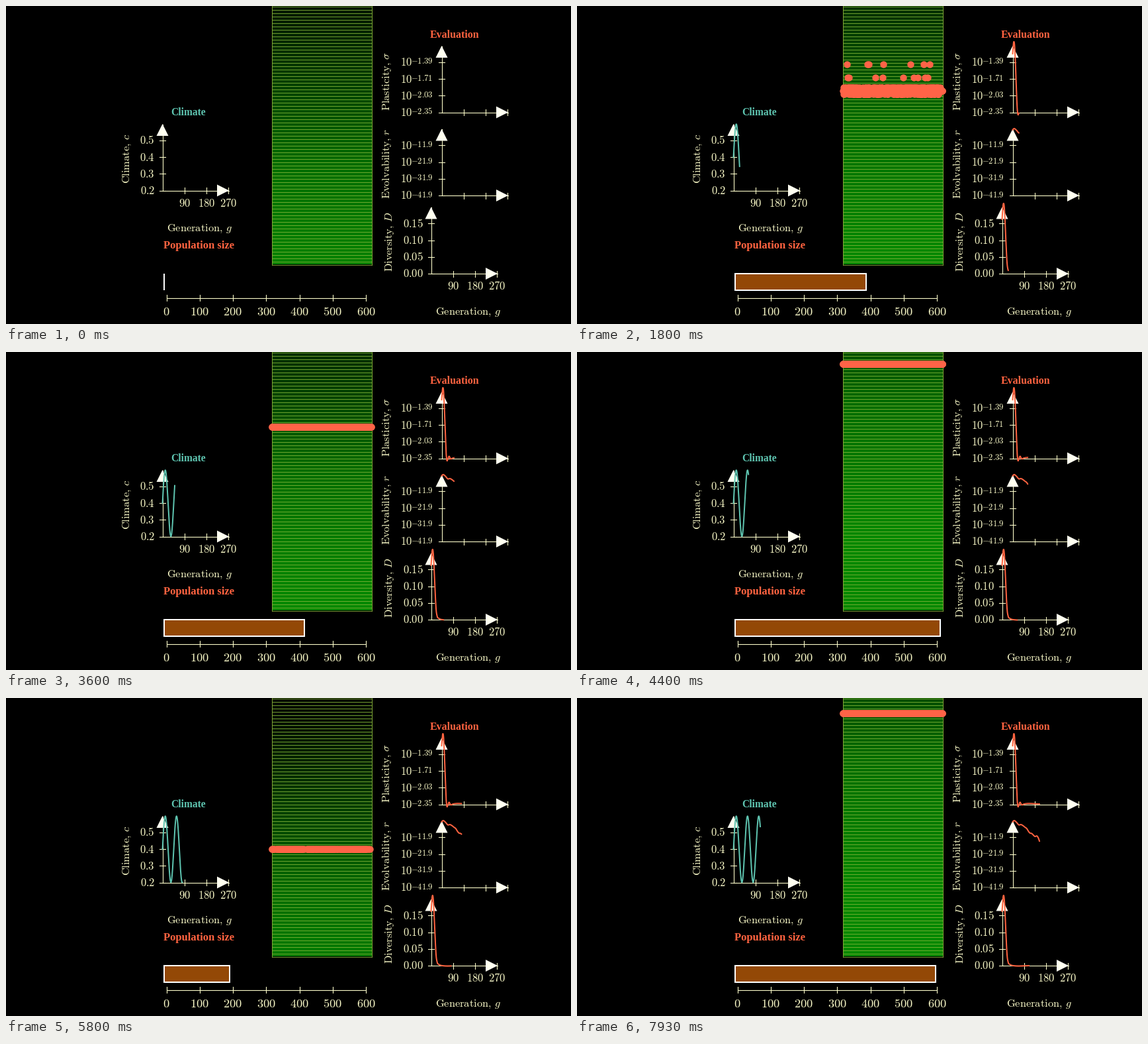
Animation of 854 by 480 pixels, one loop 8 s. Source, as a matplotlib script:

```python
import numpy as np
import matplotlib.pyplot as plt
from matplotlib.animation import FuncAnimation
from matplotlib.patches import Polygon, Rectangle

W, H, DPI = 854, 480, 64
FRAMES, LOOP = 120, 8000
PX = 72 / DPI                      # points per pixel

INK, TIP = "#fafac8", "#fffff0"
TOMATO, TEAL, BROWN = "#ff6340", "#5ec4b0", "#934806"
CYCLE = 0.02017                    # climate cycles per frame
STEP = 17 * CYCLE                  # curve pixels per frame

plt.rcParams["mathtext.fontset"] = "cm"
fig = plt.figure(figsize=(W / DPI, H / DPI), dpi=DPI, facecolor="black")
ax = fig.add_axes([0, 0, 1, 1])
ax.set_axis_off()


def line(xs, ys, color=INK, width=1.1, z=2):
    return ax.plot(xs, ys, color=color, lw=width * PX, zorder=z)[0]


def tex(x, y, s, size=16.5, ha="center", rot=0):
    ax.text(x, y, f"${s}$", color=INK, fontsize=size * PX, ha=ha, va="baseline",
            rotation=rot, rotation_mode="anchor", zorder=3)


def digits(x, y, s, size=16.7, ha="center"):
    tex(x, y + 0.325 * size, s, size, ha)


def name(x, y, word, var, rot=0):
    tex(x, y, rf"\mathrm{{{word},}}\,{var}", 16.4, rot=rot)


def title(x, y, s, color, size):
    ax.text(x, y, s, color=color, fontsize=size * PX, family="Liberation Serif",
            weight="bold", ha="left", va="baseline", zorder=3)


def axes(x, y, y_labels, powers=False, x_labels=True):
    line([x, x + 100], [y, y])
    line([x, x], [y, y - 100])
    for tip in ([(x + 100.5, y), (x + 82.5, y - 9), (x + 82.5, y + 9)],
                [(x, y - 100.5), (x - 9, y - 82.5), (x + 9, y - 82.5)]):
        ax.add_patch(Polygon(tip, color=TIP, lw=0, zorder=3))
    for i, s in enumerate(y_labels):
        ty = y - 25.2 * i
        line([x - 4.5, x + 4.5], [ty, ty])
        if powers:
            digits(x - 62.5, ty, "10", ha="left")
            digits(x - 46, ty - 1.5, "-" + s, 12.6, ha="left")
        else:
            digits(x - 11.5, ty, s, ha="right")
    for i in (1, 2, 3):
        tx = x + 33.2 * i
        line([tx, tx], [y - 4.5, y + 4.5])
        if x_labels:
            digits(tx, y + 18.7, str(90 * i))


def smooth(keys, n):
    """Cubic Hermite curve through (frame, value) points."""
    kx, ky = np.array(keys, float).T
    m = np.gradient(ky, kx)
    i = np.clip(np.searchsorted(kx, n, side="right") - 1, 0, len(kx) - 2)
    h = kx[i + 1] - kx[i]
    t = (n - kx[i]) / h
    return ((1 + 2 * t) * (1 - t) ** 2 * ky[i] + t * (1 - t) ** 2 * h * m[i]
            + t * t * (3 - 2 * t) * ky[i + 1] + t * t * (t - 1) * h * m[i + 1])


def snap(y):
    return 3 + 5 * np.round((np.asarray(y) - 3) / 5)


# Static parts
axes(236.5, 278.5, ["0.2", "0.3", "0.4", "0.5"])
axes(658.5, 160.5, ["2.35", "2.03", "1.71", "1.39"], powers=True, x_labels=False)
axes(658.5, 286, ["41.9", "31.9", "21.9", "11.9"], powers=True, x_labels=False)
axes(642.5, 404, ["0.00", "0.05", "0.10", "0.15"])

name(187, 230.5, "Climate", "c", 90)
name(580, 113, "Plasticity", r"\sigma", 90)
name(580, 238.5, "Evolvability", "r", 90)
name(584, 356, "Diversity", "D", 90)
name(292, 339.5, "Generation", "g")
name(698, 465.5, "Generation", "g")

title(249.5, 165, "Climate", TEAL, 15.5)
title(238, 366, "Population size", TOMATO, 16.6)
title(640.5, 47.5, "Evaluation", TOMATO, 15.9)

line([242.5, 544], [440.5, 440.5])
for i in range(7):
    tx = 242.5 + 50.25 * i
    line([tx, tx], [436, 445])
    digits(tx, 460.5, str(100 * i), 18.5)

# Niche band
EDGES = 0.5 + 5 * np.arange(79)
ROWS = EDGES - 2.5
band = ax.imshow(np.zeros((79, 1, 3)), extent=(401.5, 552.5, 390.5, -4.5),
                 interpolation="nearest", aspect="auto", zorder=1)
ax.hlines(EDGES, 401.5, 552.5, color="#8cb43c", lw=0.8 * PX, zorder=2)
for ex in (401.5, 552.5):
    line([ex, ex], [0, 390.5], "#8cb43c", 0.9)

# Moving parts
dots = ax.scatter([], [], s=(10.4 * PX) ** 2, color="#ff6347", lw=0, zorder=4)
bar = ax.add_patch(Rectangle((238.5, 403.5), 0, 25, fc=BROWN, ec="white",
                             lw=2 * PX, joinstyle="miter", zorder=3))

SIGMA = [(0, 72), (5, 54), (8, 58), (12, 85), (17, 130), (20, 154), (23, 163.5),
         (27, 162), (32, 157.5), (39, 161), (50, 160), (119, 160)]
EVOLV = [(0, 187), (6, 185), (12, 186), (18, 188), (27, 191.5), (36, 191),
         (45, 192.5), (54, 195), (62, 197), (70, 201.5), (77, 204), (84, 204.5),
         (90, 206.5), (98, 209), (108, 208.5), (114, 212), (119, 217)]
DIVERS = [(0, 322), (4, 302), (7, 298), (10, 305), (12, 317), (17, 355),
          (22, 388), (27, 399), (34, 402), (42, 403.5), (50, 404), (119, 404)]

T = np.linspace(0, FRAMES - 1, (FRAMES - 1) * 4 + 1)
CURVES = [(line([], [], color, 2, 5), x0 + STEP * T, ys) for color, x0, ys in (
    (TEAL, 236.5, 228.3 - 50 * np.sin(2 * np.pi * CYCLE * T)),
    (TOMATO, 658.5, smooth(SIGMA, T)),
    (TOMATO, 658.5, smooth(EVOLV, T)),
    (TOMATO, 642.5, smooth(DIVERS, T)))]

# Share of individuals per niche row while the population is still diverse
SHARE = np.array([25, 10, 30, 45, 35, 45, 40, 18, 10, 18,
                  30, 35, 45, 45, 25, 10, 50, 45, 8, 20], float)
SHARE /= SHARE.sum()

# Stragglers: distance below the main group -> x positions
FAR = {85: [406, 494], 90: [431, 546], 100: [483, 518],
       105: [410, 416, 421, 459, 465, 471, 477, 484, 492, 500, 525, 531, 538],
       125: [404, 448, 520, 531]}
NEAR = {-40: [408, 439, 441, 463, 504, 524, 533],
        -20: [409, 411, 451, 462, 493, 509, 515, 526, 530]}


def population(n, swing, early):
    center = snap(126.6 - 111 * swing + 22 * early)
    width = 0.553 * (404 - smooth(DIVERS, n)) + 1.4 * early
    count = int((408 + 220 * swing) - 40 * early)
    rng = np.random.default_rng(100 + n)
    xs = rng.uniform(402, 552.5, count)
    k = rng.choice(len(SHARE), count, p=SHARE)
    ys = snap(center + (k - 10) * 5 * width / 48)
    extra = FAR if 3 <= n < 20 else NEAR if 20 <= n < 32 else {}
    more = [(x, center + dy) for dy, row in extra.items() for x in row]
    pts = np.column_stack([xs, ys])
    return np.vstack([pts, more]) if more else pts


def draw(n):
    swing = np.cos(2 * np.pi * (CYCLE * n - 0.3215))
    early = np.clip((34 - n) / 7, 0, 1)

    warmth = 0.4 + 0.2 * swing + ROWS / 555
    rgb = np.zeros((79, 1, 3))
    rgb[:, 0, 1] = np.interp(warmth, [0.25, 0.75, 1.1], [10, 110, 136]) / 255
    band.set_data(rgb)

    if n == 0:
        dots.set_offsets(np.empty((0, 2)))
        bar.set_width(0)
    else:
        dots.set_offsets(population(n, swing, early))
        bar.set_width(438.8 + 110.7 * swing - 20 * early - 238.5)

    end = 4 * n + 1 if n else 0
    for curve, xs, ys in CURVES:
        curve.set_data(xs[:end], ys[:end])
    return [band, dots, bar] + [c[0] for c in CURVES]


ax.set_xlim(0, W)
ax.set_ylim(H, 0)
anim = FuncAnimation(fig, draw, frames=FRAMES, interval=LOOP / FRAMES,
                     repeat=True, repeat_delay=0, blit=False)
plt.show()
```
